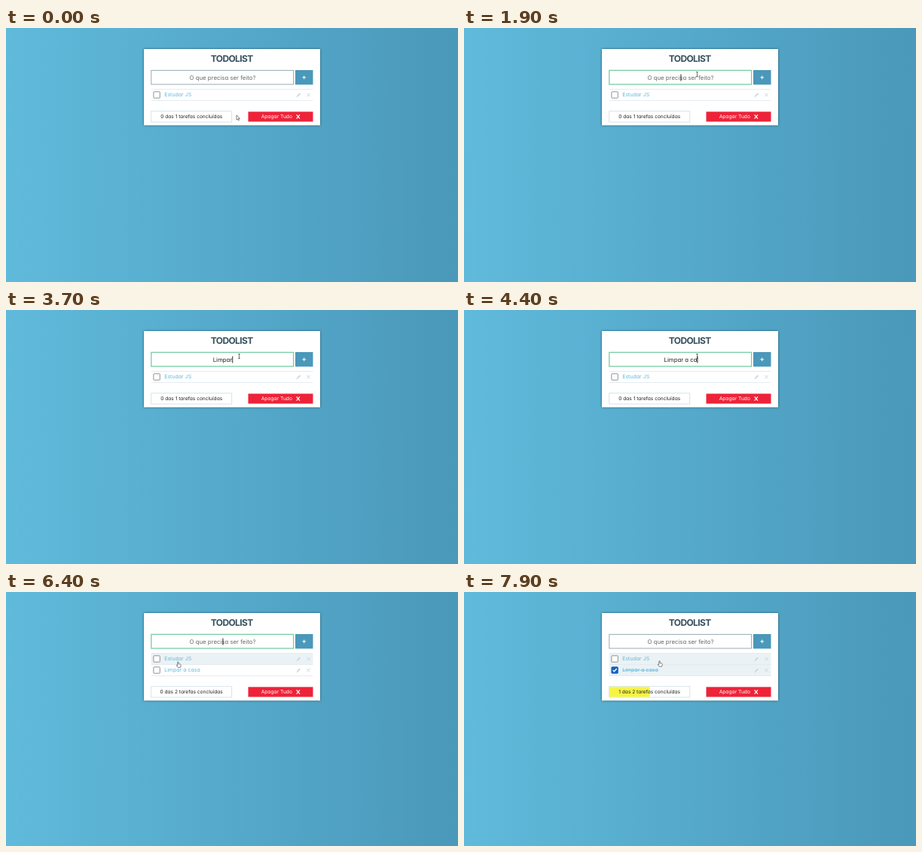
An HTML page that plays this animation: 600x338 px, repeating every 8000 ms.

```html
<!DOCTYPE html>
<html lang="pt">
<head>
<meta charset="utf-8">
<style>
  html, body { margin: 0; width: 100%; height: 100%; overflow: hidden; }
  body { background: linear-gradient(to right, #60badb, #4a98ba); }
  svg { display: block; width: 600px; height: 338px; }
  text {
    font-family: Inter, "Open Sans", sans-serif;
    font-feature-settings: "cv11";
    text-rendering: geometricPrecision;
  }
  .mid { text-anchor: middle; }
  #card { filter: drop-shadow(0 0 1.5px #1f526a); }
  .row .bg { fill: #fff; }
  .row.lit .bg { fill: #ebf2f5; }
  .row text { font-size: 7px; fill: #62b9dc; }
  .row.done text { text-decoration: line-through; }
  .box { fill: #fff; stroke: #858585; stroke-width: .9; }
  .done .box { fill: #1062c4; stroke: #1062c4; }
  .tick { display: none; fill: none; stroke: #fff; stroke-width: 1.4; }
  .done .tick { display: inline; }
  .icon { fill: none; stroke: #c9d9e0; }
  #field { fill: #fff; }
</style>
</head>
<body>
<svg viewBox="0 0 600 338">
  <defs>
    <g id="tools" class="icon">
      <path d="M386.6 90.9L390.4 87.1" stroke-width="2"/>
      <path d="M385.6 92l1.4-.5" stroke-width="1"/>
      <path d="M399.3 86.7l4.4 4.6M403.7 86.7l-4.4 4.6" stroke-width="1"/>
    </g>
  </defs>
  <rect id="card" x="183" y="28" width="234" fill="#fff"/>
  <text class="mid" x="299.7" y="45.4" font-size="12" font-weight="700" letter-spacing="-.6" fill="#36505e">TODOLIST</text>
  <rect id="field" x="192.8" y="56.4" width="188.8" height="18.6"/>
  <text id="entry" class="mid" x="287.5" y="68.6" font-size="7.8"/>
  <rect id="caret" y="61.5" width=".9" height="9" fill="#111"/>
  <rect x="384" y="56" width="23.5" height="19.4" fill="#4a98ba"/>
  <path d="M393.3 65.8h4.8M395.7 63.4v4.8" stroke="#fff" stroke-width="1"/>
  <path d="M192.5 81.5h215" stroke="#dfe8ec" stroke-width=".8"/>
  <g id="rows"></g>
  <g id="foot">
    <rect x="192.7" y="110.7" width="107" height="14.4" fill="#fff" stroke="#cfe1e9" stroke-width=".9"/>
    <rect id="bar" x="193.2" y="111.2" height="13.4"/>
    <text id="count" class="mid" x="246.2" y="120.3" font-size="6.6" fill="#222"/>
    <rect x="321.5" y="111.4" width="86" height="13.2" fill="#ee2338"/>
    <text class="mid" x="359.3" y="120.3" font-size="6.7" fill="#fff">Apagar Tudo</text>
    <path d="M385.6 115.4l4.4 5.2M390 115.4l-4.4 5.2" stroke="#fff" stroke-width="1.2"/>
  </g>
  <g id="pointer"><path id="shape" stroke-linejoin="round"/></g>
</svg>
<script>
const $ = id => document.getElementById(id);
const TASK = "Limpar a casa";
const FOCUS = 1500, TYPE = 2450, KEY = 190, ENTER = 4980, CHECK = 6700;

// Pointer path: time, x, y
const path = [[0, 306, 116], [950, 306, 116], [1400, 309.5, 61.5], [6000, 309.5, 61.5],
  [6600, 200, 103.5], [6700, 200, 103.5], [6980, 277, 103.5], [7200, 277, 103.5],
  [7800, 259.5, 91.5], [8000, 259.5, 91.5]];

const shapes = {
  arrow: ["M0 0V6.2L1.5 5L2.5 7.1L3.5 6.6L2.5 4.5H4.3Z", "#fff", "#333", .6],
  beam: ["M-1.2-3H1.2M0-3V3M-1.2 3H1.2", "none", "#333", .7],
  hand: ["M-.6 .5Q0-.4 .6 .5V3L3.2 3.6Q4 4 3.9 5L3.1 7.7H-.3L-2.2 4.9Q-2 4-.6 5Z", "#fff", "#333", .6]
};

$("rows").innerHTML = ["Estudar JS", TASK].map((name, i) => `
  <g class="row" transform="translate(0 ${i * 15})">
    <rect class="bg" x="192.5" y="82" width="215" height="14.2"/>
    <path d="M192.5 96.5h215" stroke="#dfe8ec" stroke-width=".8"/>
    <rect class="box" x="195.9" y="84.8" width="8.4" height="8.4" rx=".8"/>
    <path class="tick" d="M197.7 89.1l1.7 1.7L202.7 87"/>
    <text x="210.2" y="91.4">${name}</text>
    <use href="#tools"/>
  </g>`).join("");
const rows = document.querySelectorAll(".row");

const clamp = v => Math.max(0, Math.min(1, v));
const ease = v => v < .5 ? 4 * v ** 3 : 1 - 4 * (1 - v) ** 3;
const smooth = v => v * v * (3 - 2 * v);
const mix = (a, b, v) => a + (b - a) * v;

function set(id, attrs) {
  for (const key in attrs) $(id).setAttribute(key, attrs[key]);
}

function pointerAt(t) {
  const i = path.findIndex(p => p[0] > t);
  const [a, b] = [path[i - 1], path[i]];
  const v = smooth((t - a[0]) / (b[0] - a[0]));
  return [mix(a[1], b[1], v), mix(a[2], b[2], v)];
}

function drawEntry(t) {
  const focused = t >= FOCUS && t < CHECK;
  const typed = t < TYPE || t >= ENTER ? 0 : Math.min(TASK.length, 1 + Math.floor((t - TYPE) / KEY));
  $("entry").textContent = typed ? TASK.slice(0, typed) : "O que precisa ser feito?";
  set("entry", { fill: typed ? "#222" : "#6b6b6b" });
  set("field", { stroke: focused ? "#78cda5" : "#9aabb3", "stroke-width": focused ? 1.3 : 1 });

  // Each key press restarts the blink
  const last = t >= ENTER ? ENTER : typed ? TYPE + (typed - 1) * KEY : FOCUS;
  const shown = focused && (t - last) % 1000 < 500;
  const x = 287.5 + (typed ? $("entry").getComputedTextLength() / 2 : 0);
  set("caret", { x, opacity: +shown });
}

function draw(t) {
  const two = t >= ENTER, done = t >= CHECK;
  const [x, y] = pointerAt(t);
  const hover = y >= 82 && y < (two ? 111.5 : 96.5) ? Math.floor((y - 82) / 14.75) : -1;

  drawEntry(t);
  rows.forEach((row, i) => {
    const checked = i === 1 && done;
    row.style.display = i && !two ? "none" : "";
    row.classList.toggle("done", checked);
    row.classList.toggle("lit", checked || hover === i);
  });
  set("card", { height: two ? 116.5 : 101.5 });
  set("foot", { transform: `translate(0 ${two ? 15 : 0})` });
  $("count").textContent = `${+done} das ${1 + two} tarefas concluídas`;

  const v = ease(clamp((t - CHECK - 50) / 1050));
  set("bar", { width: 53.3 * v, fill: `rgb(${mix(237, 246, v)},${mix(28, 244, v)},${mix(52, 66, v)})` });

  const inField = y > 56 && y < 75.5;
  const [d, fill, stroke, width] = shapes[inField ? "beam" : hover >= 0 ? "hand" : "arrow"];
  set("shape", { d, fill, stroke, "stroke-width": width });
  set("pointer", { transform: `translate(${x} ${y})` });
}

function loop() {
  draw(Math.floor(performance.now() % 8000 / 100) * 100);
  requestAnimationFrame(loop);
}
loop();
</script>
</body>
</html>
```
